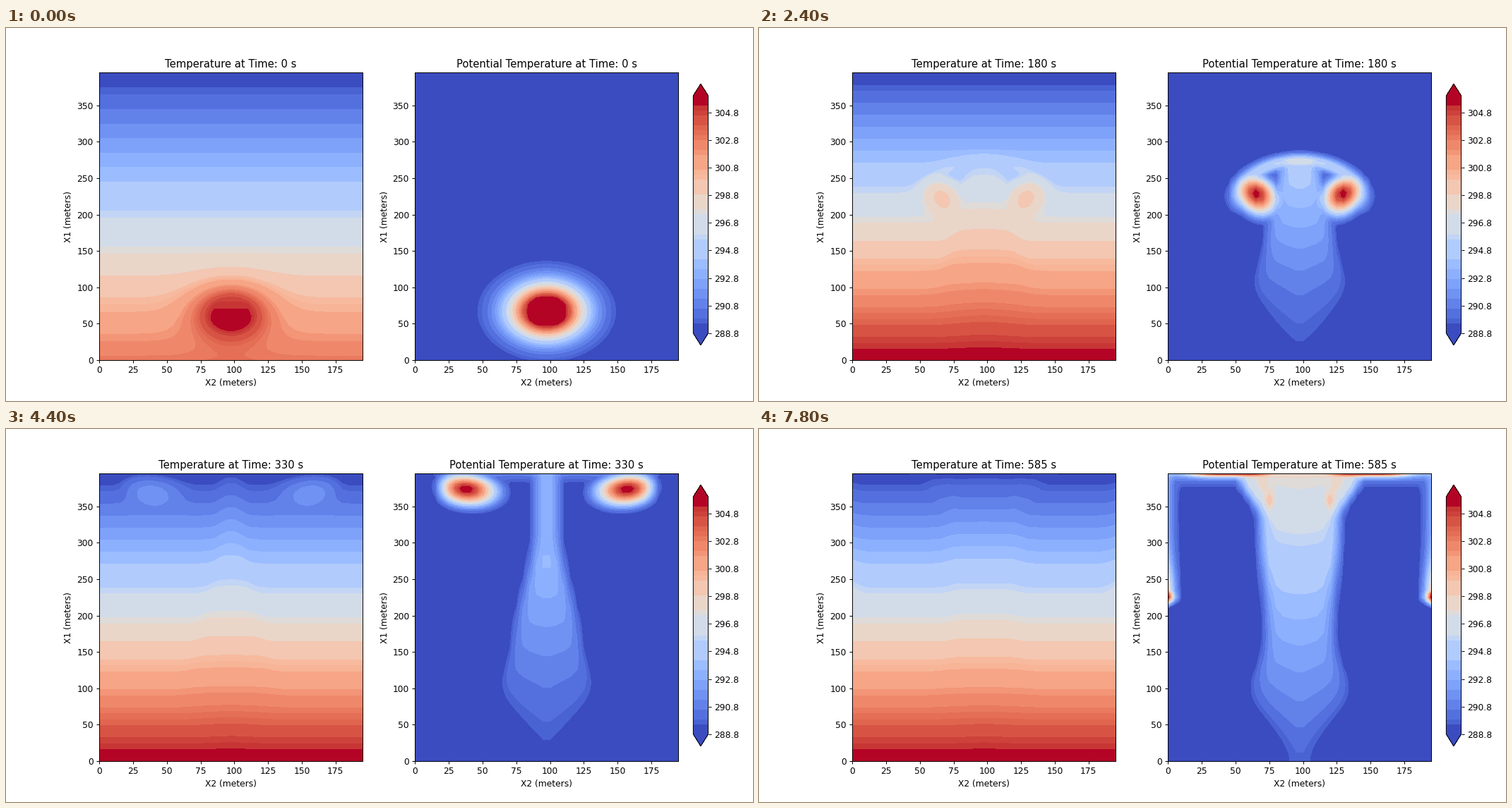
Recreate the animation shown at these times as a matplotlib script. Size 1058 by 529 pixels, loop 8 s.

```python
import numpy as np
import matplotlib.pyplot as plt
from matplotlib.animation import FuncAnimation
from matplotlib.cm import ScalarMappable
from matplotlib.colors import BoundaryNorm, ListedColormap

FRAMES, INTERVAL, STEP = 40, 200, 15
WIDTH, HEIGHT = 195, 395
START = 105  # seconds until the bubble has become a mushroom head

# 5 m grid; the flow is mirrored about the vertical centre line
X, Y = np.meshgrid(np.arange(0, WIDTH + 1, 5.0), np.arange(0, HEIGHT + 1, 5.0))
U = np.abs(X - WIDTH / 2)

# Colour bands: 48 equal steps, some of them joined
JOINED = [2, 1] + [2] * 6 + [4, 1, 4, 1, 3, 3, 1, 1, 3, 1, 2, 1, 1, 1, 2, 1, 1, 2]
BOUNDS = np.cumsum([0] + JOINED) / 48
MIDS = (BOUNDS[1:] + BOUNDS[:-1]) / 2
MIDS[0], MIDS[-1] = 0, 1
COLORS = plt.get_cmap("coolwarm")(MIDS)
LEVELS = [-1, *BOUNDS[1:-1], 2]


def ramp(v, start, end):
    """Smooth step from 0 at start to 1 at end."""
    s = np.clip((v - start) / (end - start), 0, 1)
    return s * s * (3 - 2 * s)


def sigmoid(v):
    return 0.5 * (1 + np.tanh(v / 2))


def bubble(t):
    """Flat-topped warm bubble that the thermal starts from."""
    cy = 67 + 93 * (t / START)**1.6
    return np.minimum(1, 1.32 * np.exp(-U**2 / 745 - (Y - cy)**2 / 1370))


def dome(t):
    """Distance in metres below the rising, widening front, and its base."""
    rise = 45 + 20 * ramp(t, 105, 180)
    half = 41 + 17 * ramp(t, 100, 200) + 0.3 * max(t - 240, 0)
    base = 66 + 1.235 * t - rise
    rho = np.hypot(U / half, np.maximum(Y - base, 0) / rise)
    return (1 - rho) * rise, base


def cap(t):
    depth, base = dome(t)
    strength = min(1, np.exp((START - t) / 95))
    fade = np.clip(1 + (Y - base) / 25, 0, 1) * (1 - U / 200)
    return strength * fade * np.exp(-((depth - 14) / 6)**2 / 2)


def stem(t):
    age = max(t - START, 0)
    depth, _ = dome(t)
    late = ramp(t, 360, 460)

    # Value grows with height; the contours hang down as chevrons
    lift = np.clip(Y - (1.2 - .9 * ramp(Y, 60, 220)) * U, 0, 270 + 125 * late)
    gain = .28 + .04 * late + 1.15 * np.exp(-age / 32)
    power = 1.2 + .5 * np.exp(-age / 60)
    value = .03 + .05 * ramp(t, 330, 480) + gain * (lift / 300)**power
    value += .18 * np.exp(-(HEIGHT - Y) / 30 - ((t - 480) / 50)**2)

    # Bulge at the foot, taper towards the head, flare at the ceiling
    half = 24 + 9 * (1 - ramp(t, 105, 180)) + 9 * np.exp(-((Y - 100) / 40)**2)
    half -= 16 * ramp(Y, 150, 320) * ramp(t, 105, 200) * (1 - late)
    half -= 16 * (1 - ramp(Y, 0, 90)) * ramp(t, 180, 450)
    half += late * (4 * ramp(Y, 200, 300) + 16 * ramp(Y, 330, 395))
    soft = 4.5 + 8 * (1 - ramp(Y, 30, 150))
    return value * sigmoid(2 * (half - U) / soft) * sigmoid((depth - 8) / 2.5)


def core_path(t):
    """Cores rise, drift outwards, then sink along the side walls."""
    cu = 29 + 68.5 * np.clip((t - START) / 330, 0, 1)**2.1
    cy = min(156 + .97 * (t - START), 375, 215 + 160 * np.exp((400 - t) / 70))
    return cu, cy


def core(t):
    cu, cy = core_path(t)
    depth, _ = dome(t)
    wide = 8 + 15 * ramp(t, 105, 260) - 18 * ramp(t, 340, 420)
    tall = (18 + 24 * ramp(t, 105, 250) - 18 * ramp(t, 250, 330)
            - 13 * ramp(t, 400, 470))
    lean = .15 * ramp(t, 105, 200) * (1 - ramp(t, 380, 410))
    dy = Y - cy
    du = U - cu - lean * dy
    q = (du / wide)**2 + (dy / tall / np.where(dy > 0, .85, 1))**2
    shape = .75 * np.exp(-q**1.6) + .25 * np.exp(-4 * q)
    strength = .75 + .25 * ramp(t, 105, 180)
    return strength * shape * sigmoid((depth - 4) / 2)


def ceiling(t):
    """Warm air spreading under the upper boundary."""
    gap = HEIGHT - Y
    layer = .13 * ramp(t, 270, 330) + .15 * ramp(t, 330, 560)
    reach = sigmoid((core_path(t)[0] + 20 - U) / 5)
    thin = .68 * ramp(t, 460, 585) * np.exp(-((U - 50) / 30)**4)
    return layer * reach * np.exp(-gap / 9) + thin * np.exp(-(gap / 4)**2)


def wall(t):
    """Trail left by the cores as they sink."""
    rel = Y - core_path(t)[1]
    trail = (.22 + .35 * np.exp(-(rel / 45)**2)) * sigmoid((rel + 6) / 3)
    return ramp(t, 390, 430) * trail * np.exp(-((WIDTH / 2 - U) / 5)**2)


def streak(t):
    """Pale filaments at the upper edge of the late column."""
    s = ramp(t, 480, 585)
    du = U - 12 - 11 * s + (.2 - .35 * s) * (Y - 360)
    ripple = .92 + .08 * np.cos(2 * np.pi * (Y - 385) / 25)
    return (.6 * ramp(t, 420, 480) * ripple
            * np.exp(-(du / 4.5)**2 - ((Y - 360) / 32)**4))


def fields(t):
    """Scaled temperature and potential temperature, both from 0 to 1."""
    parts = (stem, cap, core, ceiling, wall, streak)
    plume = sum(part(t)**4 for part in parts)**.25
    mix = ramp(t, 15, 90)
    theta = (1 - mix) * bubble(t) + mix * plume
    theta /= theta.max()
    temp = 1 - Y / HEIGHT + .34 * np.exp(-t / 290) * theta
    return temp / temp.max(), theta


fig, axes = plt.subplots(1, 2, figsize=(12, 6), dpi=1058 / 12)
NAMES = ("Temperature", "Potential Temperature")
for ax in axes:
    ax.set(xlim=(0, WIDTH), ylim=(0, HEIGHT),
           xlabel="X2 (meters)", ylabel="X1 (meters)")

cmap = ListedColormap(COLORS).with_extremes(under=COLORS[0], over=COLORS[-1])
norm = BoundaryNorm(288.8 + 17.2 * BOUNDS, len(COLORS))
bar = fig.colorbar(ScalarMappable(norm, cmap), cax=fig.add_axes([.92, .15, .02, .7]),
                   extend="both", spacing="proportional", format="%.1f",
                   ticks=288.8 + 2 * np.arange(9))
bar.minorticks_off()

drawn = []


def update(i):
    while drawn:
        drawn.pop().remove()
    t = i * STEP
    for ax, name, field in zip(axes, NAMES, fields(t)):
        drawn.append(ax.contourf(X, Y, field, levels=LEVELS, colors=COLORS))
        ax.set_title(f"{name} at Time: {t} s")
    return drawn


anim = FuncAnimation(fig, update, frames=FRAMES, interval=INTERVAL,
                     init_func=lambda: update(0), repeat=True,
                     repeat_delay=0, blit=False)
plt.show()
```
